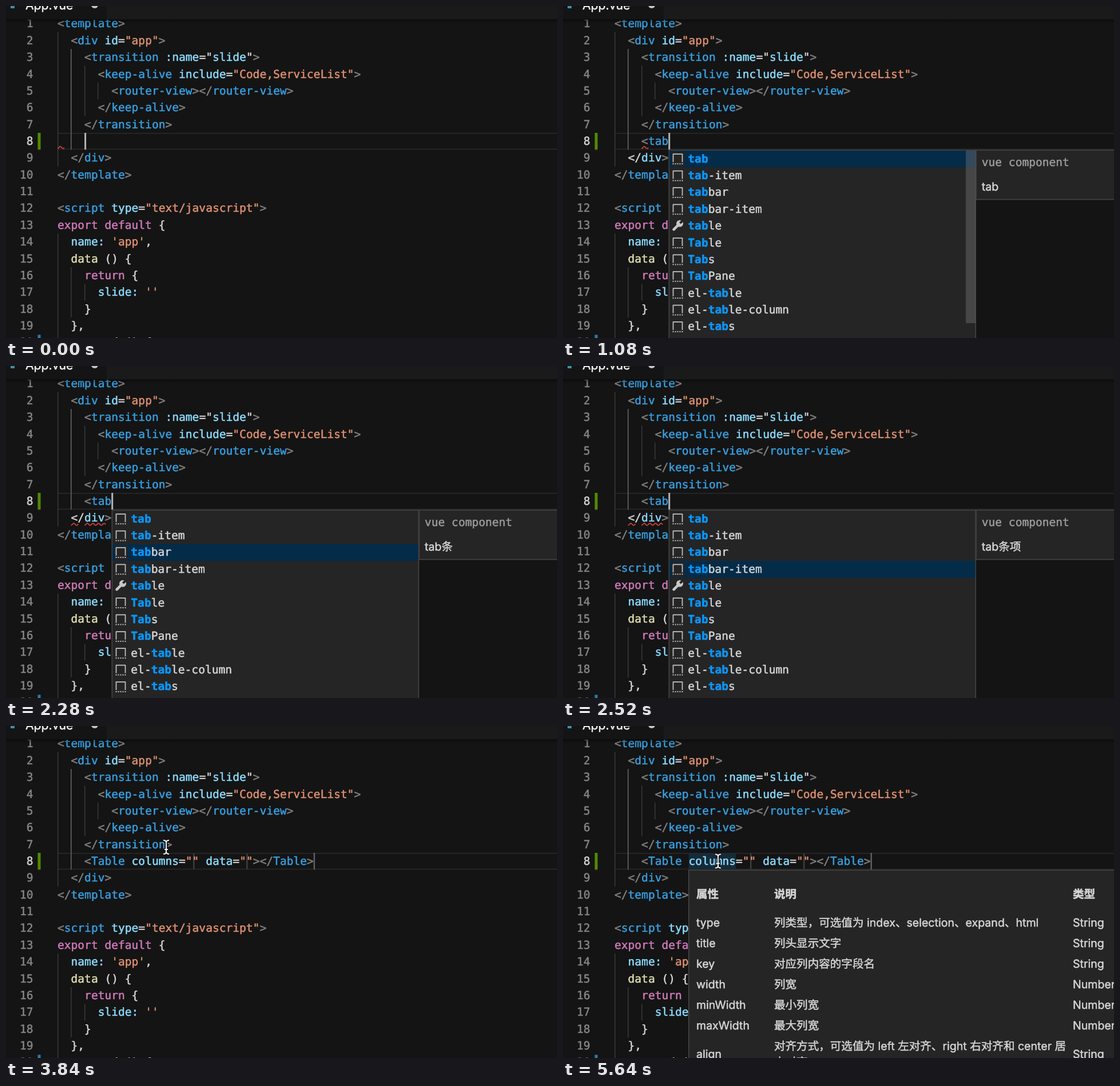
Write an HTML page with a canvas that moves like this. It is 963 px wide and 581 px high and loops after 5700 ms.

```html
<!DOCTYPE html>
<html lang="zh-CN">
<head>
<meta charset="utf-8">
<title>Component completion</title>
<style>
html, body { margin: 0; width: 100%; height: 100%; overflow: hidden; background: #141414; }
canvas { display: block; }
</style>
</head>
<body>
<canvas id="stage" width="963" height="581"></canvas>
<script>
const ctx = document.getElementById('stage').getContext('2d');
const W = 963, H = 581, LOOP = 5700;
const SIZE = 19.57, CHAR = 11.78, ROW = 29.37, LEFT = 90, TOP = 16.4, BASE = 21;
const MONO = `${SIZE}px "DejaVu Sans Mono", monospace`;
const SANS = `${SIZE}px Inter, "Noto Sans CJK SC", "Noto Sans CJK", sans-serif`;
const COLORS = {
  g: '#808080', t: '#379fe0', a: '#8bdcff', s: '#df906f',
  k: '#d07ab9', f: '#dedcab', w: '#d6d6d6'
};
const PANEL = '#252526', BORDER = '#454545', SELECTED = '#042c49', MATCH = '#0a97f8';

// Tokens are separated by "|"; the first letter of each is its colour.
const LINES = [
  'g<|ttemplate|g>',
  'w  |g<|tdiv|w |aid|w=|s"app"|g>',
  'w    |g<|ttransition|w |a:name|w="|aslide|w"|g>',
  'w      |g<|tkeep-alive|w |ainclude|w=|s"Code,ServiceList"|g>',
  'w        |g<|trouter-view|g></|trouter-view|g>',
  'w      |g</|tkeep-alive|g>',
  'w    |g</|ttransition|g>',
  '',
  'w  |g</|tdiv|g>',
  'g</|ttemplate|g>',
  '',
  'g<|tscript|w |atype|w=|s"text/javascript"|g>',
  'kexport default|w {',
  "w  |aname:|w |s'app'|w,",
  'w  |fdata|w () {',
  'w    |kreturn|w {',
  "w      |aslide:|w |s''",
  'w    }',
  'w  },',
  'w  |fmounted|w () {'
];
const BROKEN_END = 'w  </|adiv|g>';
const INSERTED = 'w    |g<|tTable|w |acolumns|w=|s""|w |adata|w=|s""|g></|tTable|g>';

const ALL = ['popup-header', 'popover', 'spinner', 'toast', 'button-tab', 'button-tab-item',
  'tab', 'tab-item', 'tabbar', 'tabbar-item', 'x-header', 'row'];
const FILTERED = ['tab', 'tab-item', 'tabbar', 'tabbar-item', 'table', 'Table', 'Tabs',
  'TabPane', 'el-table', 'el-table-column', 'el-tabs'];
const DOCS = [['tab'], ['tab项'], ['tab条'], ['tab条项'], null,
  ['表格，slot：header（表头）', '载中）']];
const PROPS = [
  ['type', '列类型，可选值为 index、selection、expand、html', 'String'],
  ['title', '列头显示文字', 'String'],
  ['key', '对应列内容的字段名', 'String'],
  ['width', '列宽', 'Number'],
  ['minWidth', '最小列宽', 'Number'],
  ['maxWidth', '最大列宽', 'Number']
];
const ALIGN = '对齐方式，可选值为 left 左对齐、right 右对齐和 center 居';

const TYPED = [[360, '<'], [690, '<t'], [900, '<ta'], [1020, '<tab']];
const PICKS = [[0, 0], [1980, 1], [2160, 2], [2520, 3], [2760, 4], [2940, 5]];
const ERROR_AT = 1500, INSERT_AT = 3360, POINTER_AT = 3600, HOVER_AT = 4500;

const col = n => LEFT + n * CHAR;
const rowTop = n => TOP + (n - 1) * ROW;
const latest = (list, t, start) => list.reduce((v, [at, x]) => t >= at ? x : v, start);

function rect(x, y, w, h, color) {
  ctx.fillStyle = color;
  ctx.fillRect(x, y, w, h);
}

// The thin outline gives the heavier strokes of smoothed screen text.
function write(text, x, y, color, font = MONO) {
  ctx.font = font;
  ctx.fillStyle = ctx.strokeStyle = color;
  ctx.lineWidth = 0.5;
  ctx.fillText(text, x, y);
  ctx.strokeText(text, x, y);
}

function code(line, n) {
  let c = 0;
  for (const token of line.split('|')) {
    const text = token.slice(1);
    write(text, col(c), rowTop(n) + BASE, COLORS[token[0]]);
    c += text.length;
  }
}

function squiggle(x, w, n) {
  const y = rowTop(n) + 25.7;
  ctx.strokeStyle = '#e0463c';
  ctx.lineWidth = 1.6;
  ctx.beginPath();
  for (let i = 0; i <= w; i++) ctx.lineTo(x + i, y + 1.8 * Math.cos(i * Math.PI / 4.9));
  ctx.stroke();
}

function box(x, y, w, h) {
  rect(x, y, w, h, BORDER);
  rect(x + 1.6, y + 1.6, w - 3.2, h - 3.2, PANEL);
}

function guide(level, from, to, color = '#393939') {
  rect(Math.floor(col(level * 2)), rowTop(from), 1.5, (to - from + 1) * ROW, color);
}

function header() {
  rect(0, 0, W, 24, '#1a1a1a');
  rect(0, 0, 176, 24, '#141414');
  const shade = ctx.createLinearGradient(0, 23, 0, 31);
  shade.addColorStop(0, 'rgba(0,0,0,.4)');
  shade.addColorStop(1, 'rgba(0,0,0,0)');
  rect(0, 23, W, 8, shade);
  rect(8, 0, 7, 4, '#3f8fa8');
  write('App.vue', 34, 5.5, '#f2f2f2', SANS.replace(SIZE, 21.2));
  ctx.fillStyle = '#c8c8c8';
  ctx.beginPath();
  ctx.arc(155, -2, 6, 0, 7);
  ctx.fill();
}

function tagIcon(x, y) {
  rect(x - 2, y - 4, 22, 26, PANEL);
  ctx.strokeStyle = '#c5c5c5';
  ctx.lineWidth = 1.7;
  ctx.beginPath();
  ctx.moveTo(x, y + 14);
  ctx.lineTo(x, y);
  ctx.lineTo(x + 16, y);
  ctx.lineTo(x + 16, y + 14);
  ctx.stroke();
  for (let i = 0; i < 5; i++) rect(x - 1 + i * 4, y + 16, 2, 2, '#c5c5c5');
}

function wrenchIcon(x, y) {
  ctx.strokeStyle = ctx.fillStyle = '#c8c8c8';
  ctx.lineWidth = 4.6;
  ctx.lineCap = 'round';
  ctx.beginPath();
  ctx.moveTo(x + 2, y + 16);
  ctx.lineTo(x + 11, y + 7);
  ctx.stroke();
  ctx.lineCap = 'butt';
  ctx.beginPath();
  ctx.arc(x + 12.5, y + 5.5, 6, 0, 7);
  ctx.fill();
  ctx.strokeStyle = PANEL;
  ctx.lineWidth = 4;
  ctx.beginPath();
  ctx.moveTo(x + 13, y + 5);
  ctx.lineTo(x + 20, y - 2);
  ctx.stroke();
}

function item(label, x, y, match) {
  const at = match ? label.toLowerCase().indexOf(match) : -1;
  if (at < 0) return write(label, x, y, COLORS.w);
  const end = at + match.length;
  write(label.slice(0, at), x, y, COLORS.w);
  write(label.slice(at, end), x + at * CHAR, y, MATCH, 'bold ' + MONO);
  write(label.slice(end), x + end * CHAR, y, COLORS.w);
}

function docPanel(x, lines) {
  box(x, 251.5, W - x + 20, 58.5 + lines.length * ROW);
  write('vue component', x + 10.5, 280, '#9b9b9b');
  lines.forEach((line, i) => write(line, x + 10.5, 323 + i * ROW, COLORS.w, SANS));
}

function completion(t, typed) {
  const x = col(4 + typed.length) + 0.3, w = 537.5;
  const filtered = typed.length > 2;
  const list = filtered ? FILTERED : ALL;
  const picked = filtered ? latest(PICKS, t, 0) : ALL.length - 1;
  const match = filtered ? typed.slice(1) : '';
  const docs = filtered ? DOCS[picked] : ['栅格行'];
  if (docs) docPanel(x + w - 0.8, docs);
  box(x, 251.5, w, 400);
  rect(x + 1.6, 253 + picked * ROW, w - 3.2, ROW, SELECTED);
  list.forEach((label, i) => {
    const y = 252.7 + i * ROW;
    if (label === 'table') wrenchIcon(x + 7, y + 5);
    else tagIcon(x + 8, y + 6.5);
    item(label, x + 33.8, y + BASE, match);
  });
  if (!filtered) rect(x + w - 18, 364, 17, 33, '#424242');
  else if (t < 2160) {
    ctx.globalAlpha = Math.min(1, (2160 - t) / 240);
    rect(x + w - 18, 253, 17, 302, 'rgba(121,121,121,.4)');
    ctx.globalAlpha = 1;
  }
}

function hoverTable() {
  box(219, 251.5, 780, 400);
  const cells = (texts, y, font = SANS) =>
    texts.forEach((s, i) => write(s, [233, 369, 891][i], y, COLORS.w, font));
  cells(['属性', '说明', '类型'], 300.5, 'bold ' + SANS);
  PROPS.forEach((p, i) => cells(p, 351 + i * 35.9));
  cells(['', ALIGN], 567);
  cells(['align', '', 'String'], 581);
  cells(['', '中对齐'], 594.5);
}

function pointer(t) {
  const p = Math.min(1, Math.max(0, (t - 3900) / 360));
  const e = p * p * (3 - 2 * p);
  const x = 280 - 9 * e, y = 212 + 24.5 * e;
  for (const [color, width] of [['#111', 5], ['#f4f4f4', 2]]) {
    ctx.strokeStyle = color;
    ctx.lineWidth = width;
    ctx.beginPath();
    for (const s of [-1, 1]) {
      ctx.moveTo(x - 5, y + s * 12);
      ctx.quadraticCurveTo(x, y + s * 12, x, y + s * 8);
      ctx.quadraticCurveTo(x, y + s * 12, x + 5, y + s * 12);
    }
    ctx.moveTo(x, y - 9);
    ctx.lineTo(x, y + 9);
    ctx.moveTo(x - 3, y + 4);
    ctx.lineTo(x + 3, y + 4);
    ctx.stroke();
  }
}

function draw(t) {
  const inserted = t >= INSERT_AT;
  const typed = inserted ? '' : latest(TYPED, t, '');
  const hover = t >= HOVER_AT;
  ctx.textRendering = 'geometricPrecision';
  ctx.lineJoin = 'round';
  rect(0, 0, W, H, '#141414');

  const y = rowTop(8);
  rect(LEFT, y, W, 1.7, '#282828');
  rect(LEFT, y + ROW - 1.7, W, 1.7, '#282828');
  rect(55.5, y, 5, ROW, '#528a04');
  rect(55.5, rowTop(20) + 1, 5, ROW, '#2a7cac');
  if (hover) rect(col(11), y, 7 * CHAR, ROW, '#172a38');

  guide(0, 2, 9);
  guide(1, 3, 8, '#686868');
  guide(2, 4, 6);
  guide(3, 5, 5);
  guide(0, 14, 20);
  guide(1, 16, 18);
  guide(2, 17, 17);

  LINES.forEach((line, i) => {
    const n = i + 1, label = String(n);
    write(label, 47.5 - label.length * CHAR, rowTop(n) + BASE, n === 8 ? '#d2d2d2' : '#858585');
    if (line) code(n === 9 && typed ? BROKEN_END : line, n);
  });

  if (inserted) {
    rect(327, y + 1, 2.5, ROW - 2, '#3d3d3d');
    rect(420, y + 1, 2.5, ROW - 2, '#3d3d3d');
    code(INSERTED, 8);
    rect(537.5, y, 2.5, ROW, '#5e5e5e');
  } else {
    if (typed) code('w    |g<|t' + typed.slice(1), 8);
    if (!typed) squiggle(LEFT, 12, 8);
    else if (t < ERROR_AT) squiggle(col(4), 12, 8);
    else {
      squiggle(col(2), 13, 9);
      squiggle(col(4), 37, 9);
    }
    rect(col(4 + typed.length), y, 3, ROW, '#b4b5b3');
  }

  header();
  if (typed) completion(t, typed);
  if (hover) hoverTable();
  if (t >= POINTER_AT) pointer(t);
}

const start = performance.now();
function frame() {
  draw((performance.now() - start) % LOOP);
  requestAnimationFrame(frame);
}
frame();
</script>
</body>
</html>
```
